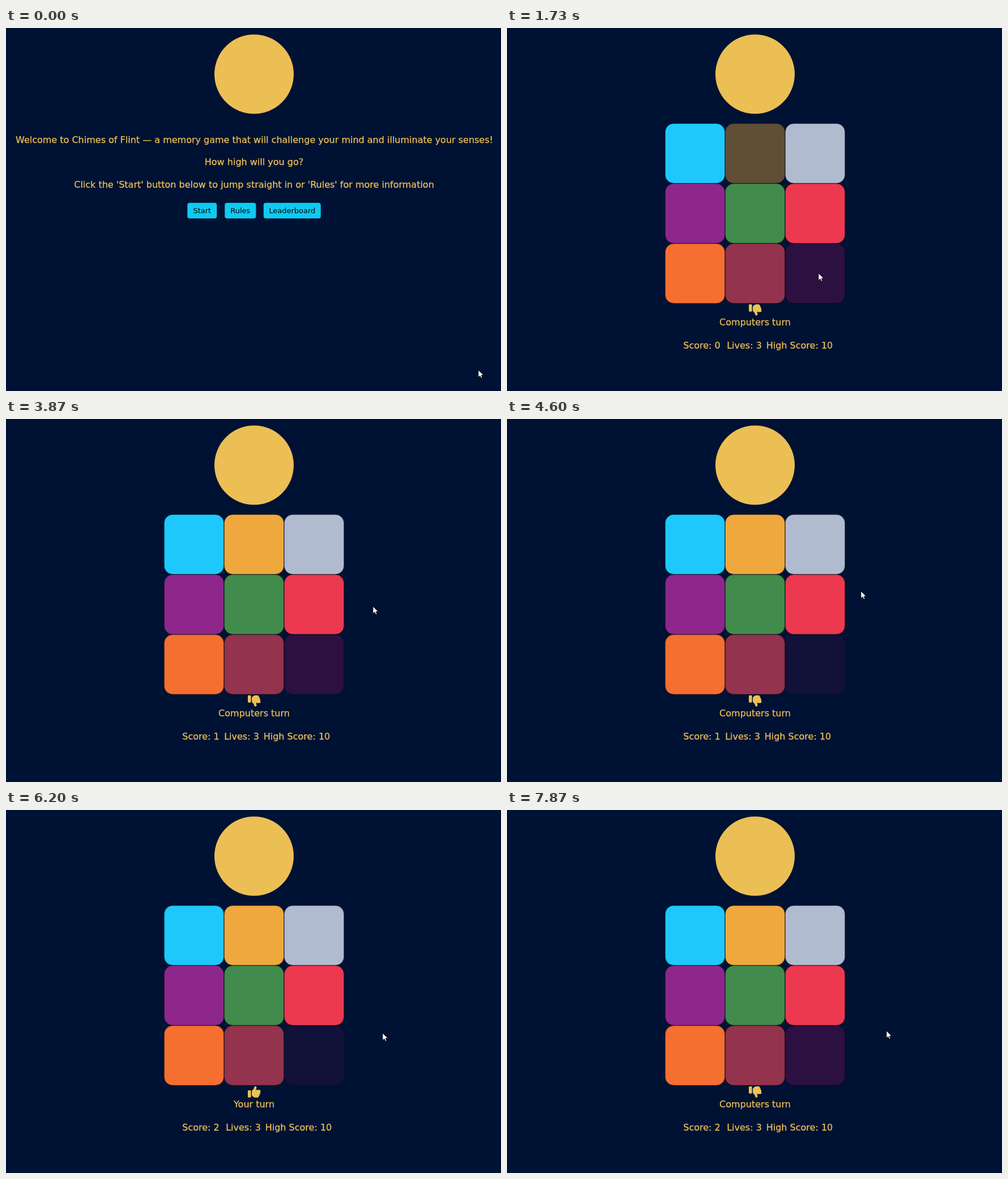
Recreate the animation shown at these times as an HTML page. Size 874 px wide and 641 px high, loop 8000 ms.

```html
<!DOCTYPE html>
<html lang="en">
<head>
<meta charset="utf-8">
<title>Memory game</title>
<style>
  html, body { margin: 0; width: 100%; height: 100%; overflow: hidden; background: #001233; }
  svg { display: block; }
  text { font: 16px "DejaVu Sans", sans-serif; fill: #efc356; stroke: #efc356; stroke-width: .25; text-anchor: middle; }
  .button text { font-size: 13px; fill: #000; stroke: none; }
  .button rect { fill: #0fcaf0; }
  .button.hover rect { fill: #3dd5f3; }
  .tile { stroke: #000; stroke-width: .5; }
</style>
</head>
<body>
<svg width="874" height="641" viewBox="0 0 874 641">
  <circle cx="438" cy="81.5" r="70" fill="#ecbf55"/>
  <g id="intro">
    <text x="438.5" y="203">Welcome to Chimes of Flint — a memory game that will challenge your mind and illuminate your senses!</text>
    <text x="438" y="242">How high will you go?</text>
    <text x="438" y="282">Click the 'Start' button below to jump straight in or 'Rules' for more information</text>
  </g>
  <g id="game">
    <g id="tiles"></g>
    <path id="thumb" fill="#ecc155" d="M1.4 7H4.2Q5.6 7 5.6 8.4V18.3Q5.6 19.7 4.2 19.7H1.4Q0 19.7 0 18.3V8.4Q0 7 1.4 7ZM7 9.4Q7 7.4 8.6 6.1C10.2 4.9 11 3.4 11.3 1.7 11.5 .5 12.6-.2 13.8 .1 15 .3 15.7 1.4 15.4 2.5 15.2 3.9 14.8 5.1 14.1 6.3H20.4A2.1 2.1 0 0 1 21.4 10.3 2.1 2.1 0 0 1 20.5 14 2.1 2.1 0 0 1 19.3 17.1 2.1 2.1 0 0 1 17.2 19.7H13Q11.7 19.7 10.6 19L8.9 17.9Q7 16.6 7 14.4Z"/>
    <text id="turn" x="438" y="525"></text>
    <text id="score" x="344" y="565.5"></text>
    <text id="lives" y="565.5">Lives: 3</text>
    <text id="high" y="565.5">High Score: 10</text>
  </g>
  <path id="cursor" fill="#fff" stroke="#000" stroke-width=".7" d="M0 0V12.6L3 9.9 5 14.3 7 13.4 5.1 9.1H9Z"/>
</svg>
<script>
const LOOP = 8000, BOARD_AT = 930;
const $ = id => document.getElementById(id);

function add(parent, tag, attrs, text = '') {
  const el = document.createElementNS('http://www.w3.org/2000/svg', tag);
  for (const key in attrs) el.setAttribute(key, attrs[key]);
  el.textContent = text;
  return parent.appendChild(el);
}

const buttons = [['Start', 320.3, 52], ['Rules', 386.3, 55], ['Leaderboard', 454.8, 101]].map(([label, x, width]) => {
  const el = add($('intro'), 'g', { class: 'button' });
  add(el, 'rect', { x, y: 308.8, width, height: 27.4, rx: 4 });
  add(el, 'text', { x: x + width / 2, y: 327 }, label);
  return { el, x, width };
});

const colors = ['#1ec8fd', '#efa83e', '#b1bbd0', '#8e278c', '#418b4c', '#ec394f', '#f56f31', '#93334d', '#2d1042'];
const tiles = colors.map((fill, i) => add($('tiles'), 'rect', {
  class: 'tile', fill, x: 279.25 + 106 * (i % 3), y: 168.75 + 106 * Math.floor(i / 3), width: 105.5, height: 105.5, rx: 15
}));

const YELLOW = 1, VIOLET = 8, FLASH = 400;
const flashes = [[1470, YELLOW], [2670, YELLOW], [3470, YELLOW], [4270, VIOLET],
                 [5200, YELLOW], [5870, VIOLET], [6670, YELLOW], [7470, VIOLET]];
const playerTurns = [[2270, 3070], [5000, 6270]];

// Pointer stops: time, x, y
const path = [
  [30, 834, 604], [870, 346, 322], [950, 346, 322], [1730, 550, 433], [1830, 550, 433],
  [2530, 459, 268], [2830, 459, 268], [3470, 647, 341], [3730, 647, 331], [3830, 647, 331],
  [4130, 674, 331], [4240, 674, 331], [4400, 691, 329], [5000, 439, 233], [5220, 439, 233],
  [5670, 530, 391], [6010, 530, 391], [6200, 665, 394], [6470, 670, 390]
];

function pointerAt(t) {
  const next = path.findIndex(p => p[0] > t);
  if (next < 1) return (next ? path[path.length - 1] : path[0]).slice(1);
  const [t0, x0, y0] = path[next - 1], [t1, x1, y1] = path[next];
  const u = (t - t0) / (t1 - t0), k = u * u * (3 - 2 * u);
  return [x0 + (x1 - x0) * k, y0 + (y1 - y0) * k];
}

function draw(now) {
  const t = now % LOOP;
  const playing = t >= BOARD_AT;
  $('intro').style.display = playing ? 'none' : '';
  $('game').style.display = playing ? '' : 'none';

  const [x, y] = pointerAt(t).map(Math.round);
  $('cursor').setAttribute('transform', `translate(${x} ${y})`);
  for (const b of buttons)
    b.el.classList.toggle('hover', x > b.x && x < b.x + b.width && y > 309 && y < 336);

  tiles.forEach((tile, i) => {
    const dim = flashes.some(([at, id]) => id === i && t >= at && t < at + FLASH);
    tile.setAttribute('opacity', dim ? .4 : 1);
  });

  const yours = playerTurns.some(([from, to]) => t >= from && t < to);
  $('turn').textContent = yours ? 'Your turn' : 'Computers turn';
  $('thumb').setAttribute('transform', yours ? 'translate(427 488)' : 'translate(427 507.7) scale(1 -1)');

  const score = t < 2670 ? 0 : t < 5870 ? 1 : 2;
  const shift = score === 1 ? 3 : 0; // the digit 1 is narrower
  $('score').textContent = 'Score: ' + score;
  $('lives').setAttribute('x', 419 - shift);
  $('high').setAttribute('x', 516.5 - shift);
}

function frame() {
  draw(performance.now());
  requestAnimationFrame(frame);
}
frame();
</script>
</body>
</html>
```
